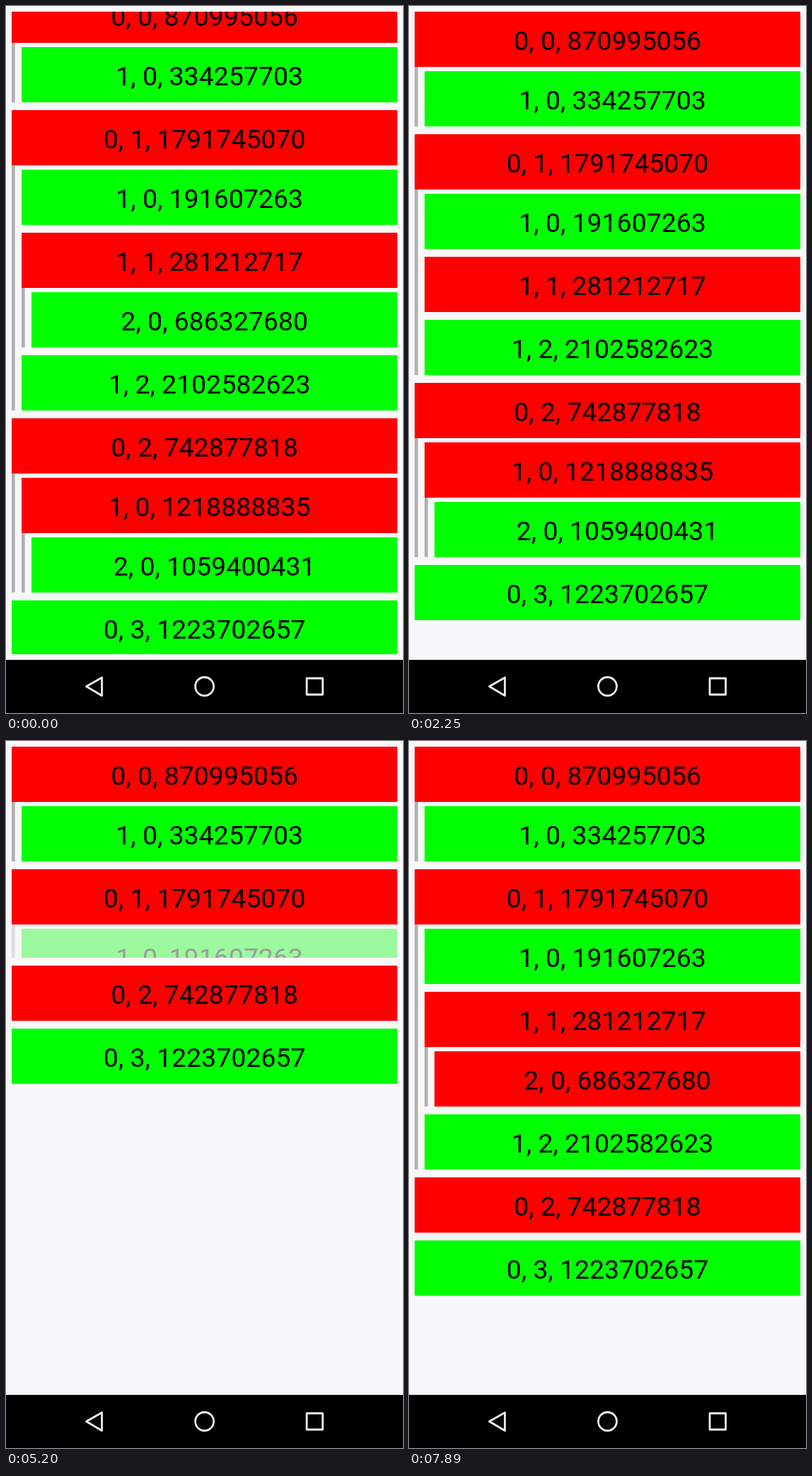
An HTML page for the animation above (8000 ms loop, 561x998 px).

```html
<!DOCTYPE html>
<html lang="en">
<head>
<meta charset="utf-8">
<title>Collapsible tree list</title>
<style>
  html, body { margin: 0; width: 100%; height: 100%; overflow: hidden; background: #f8f8fb; }
  #viewport { position: absolute; left: 8px; top: 8px; width: 545px; height: 907px; overflow: hidden; }
  .node + .node { margin-top: 11px; }
  .row {
    height: 78px; background: #f00; color: #000; text-align: center; white-space: nowrap;
    font: 37.4px/82px Roboto, sans-serif;
  }
  .row.leaf { background: #0f0; }
  .kids {
    overflow: hidden; padding-left: 14px;
    background: linear-gradient(#b0b0b0, #b0b0b0) 0 0 / 4.67px 100% no-repeat;
  }
  .kids > .node:first-child { margin-top: 6px; }
  #glow { position: absolute; border-radius: 50%; background: #3f51b5; }
  #nav { position: absolute; left: 0; top: 923px; background: #000; }
</style>
</head>
<body>
<div id="viewport"><div id="list"></div><div id="glow"></div></div>
<svg id="nav" width="561" height="75" fill="none" stroke="#eee" stroke-width="2.8" stroke-linejoin="round">
  <path d="M113.5 37.5 L135.5 25 V50.5 Z"/>
  <circle cx="280.5" cy="37.5" r="13"/>
  <rect x="425" y="26" width="22.5" height="23"/>
</svg>
<script>
const LOOP = 8000;
const ROW = 78, FIRST_GAP = 6, GAP = 11;
const GLOW_RADIUS = 817, GLOW_HEIGHT = 109.5, GLOW_X = 262;

// Each toggle is [start, duration, open state at the end].
const item = (number, kids = [], toggles = []) => ({ number, kids, toggles });
const leaf = item(686327680);
const tree = [
  item(870995056, [item(334257703)]),
  item(1791745070, [
    item(191607263),
    item(281212717, [leaf], [[2120, 130, 0], [6330, 190, 1]]),
    item(2102582623),
  ], [[4115, 295, 0], [4958, 432, 1]]),
  item(742877818, [item(1218888835, [item(1059400431)])], [[2990, 250, 0]]),
  item(1223702657),
];

const list = document.getElementById('list');
const glow = document.getElementById('glow');

const clamp = x => Math.min(1, Math.max(0, x));
const progress = (time, start, duration) => clamp((time - start) / duration);
const easeInOut = p => (1 - Math.cos(Math.PI * p)) / 2;

function addDiv(parent, className) {
  const div = document.createElement('div');
  div.className = className;
  return parent.appendChild(div);
}

function build(node, index, depth, parent) {
  const box = addDiv(parent, 'node');
  node.row = addDiv(box, node.kids.length ? 'row' : 'row leaf');
  node.row.textContent = `${depth}, ${index}, ${node.number}`;
  if (!node.kids.length) return;
  node.box = addDiv(box, 'kids');
  node.kids.forEach((kid, i) => build(kid, i, depth + 1, node.box));
}

function openness(node, time) {
  let open = 1;
  for (const [start, duration, end] of node.toggles) {
    open += (end - open) * progress(time, start, duration) ** 3;
  }
  return open;
}

// Sizes the subtree and returns its visible height.
function layout(node, time) {
  if (!node.kids.length) return ROW;
  const full = node.kids.reduce((sum, kid) => sum + layout(kid, time),
    FIRST_GAP + GAP * (node.kids.length - 1));
  const open = openness(node, time);
  const height = Math.round(open * full);
  node.box.style.height = height + 'px';
  node.box.style.opacity = 0.23 + 0.77 * open;
  return ROW + height;
}

function drawGlow(time) {
  const pull = progress(time, 520, 350);
  const left = (1 - progress(time, 970, 600)) ** 2;
  const scale = 0.76 * Math.sqrt(pull) * left;
  Object.assign(glow.style, {
    left: GLOW_X - GLOW_RADIUS + 'px',
    top: (GLOW_HEIGHT - 2 * GLOW_RADIUS) * scale + 'px',
    width: 2 * GLOW_RADIUS + 'px',
    height: 2 * GLOW_RADIUS * scale + 'px',
    opacity: 0.14 * pull * left,
  });
}

function render(time) {
  tree.forEach(node => layout(node, time));
  leaf.row.classList.toggle('leaf', time < 7890);
  const scroll = Math.round(34 * (1 - easeInOut(progress(time, 40, 480))));
  list.style.transform = `translateY(${-scroll}px)`;
  drawGlow(time);
}

tree.forEach((node, i) => build(node, i, 0, list));
const begin = performance.now();
function tick() {
  render((performance.now() - begin) % LOOP);
  requestAnimationFrame(tick);
}
tick();
</script>
</body>
</html>
```
